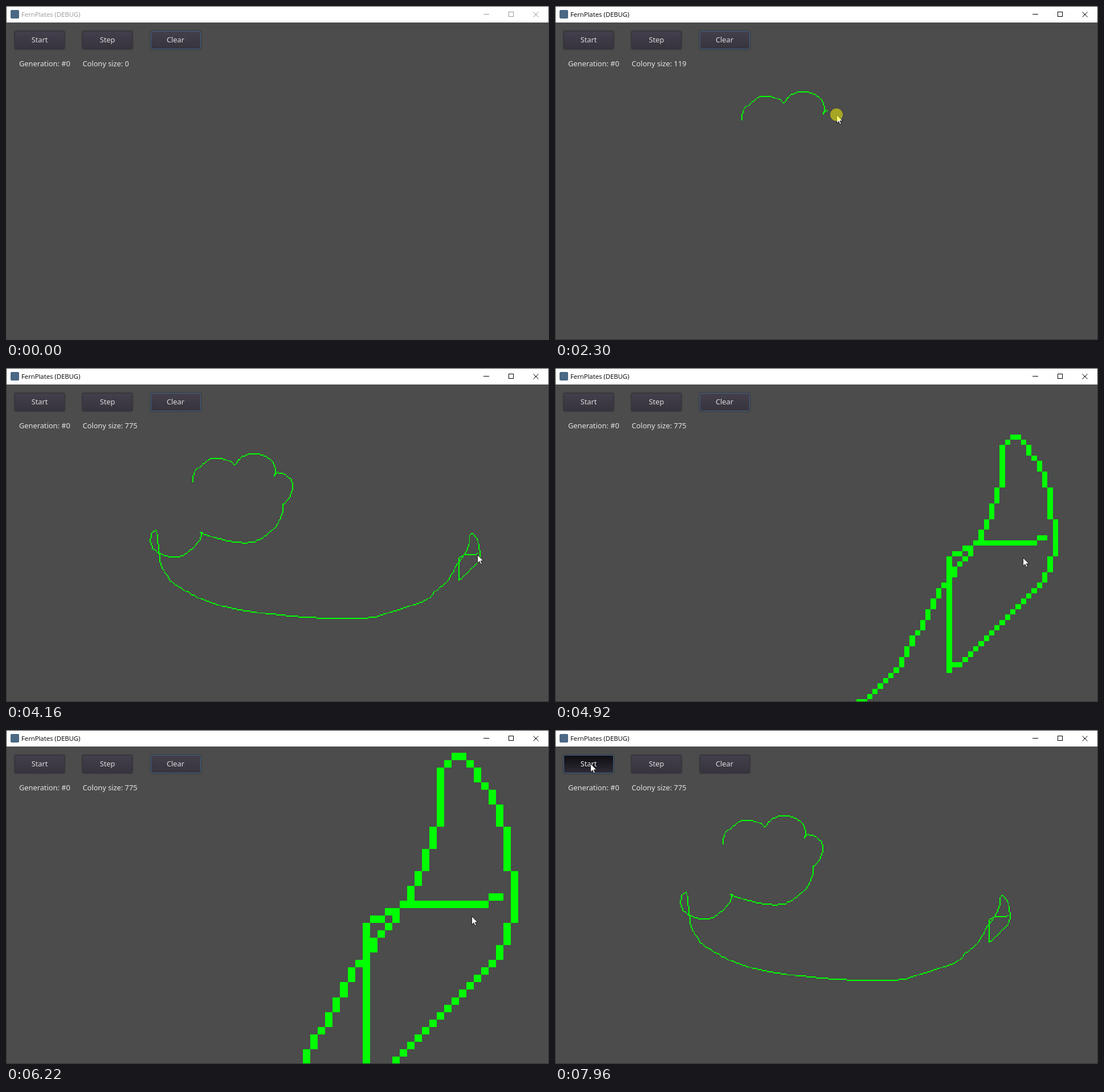
Write an HTML page with a canvas that moves like this. It is 953x587 px and loops after 8000 ms.

```html
<!DOCTYPE html>
<html lang="en">
<head>
<meta charset="utf-8">
<title>FernPlates</title>
<style>
  html, body { margin: 0; width: 100%; height: 100%; overflow: hidden; }
  #win { position: relative; width: 953px; height: 587px; overflow: hidden; background: #4b4c4b; }
  #win > * { position: absolute; }
  #field { left: 0; top: 0; }
  #bar { left: 0; top: 0; width: 953px; height: 29px; background: #fff; color: #999; }
  .active #bar { color: #000; }
  #bar * { position: absolute; }
  #icon { left: 8px; top: 7px; width: 15px; height: 15px; border-radius: 2px; background: #4b6884; }
  #name { left: 27px; top: 0; font: 11.3px/29px "Open Sans", sans-serif; white-space: pre; }
  #bar svg { left: 830px; top: 0; }
  .btn { top: 44px; width: 86px; height: 30px; border: 1px solid #34323a; border-radius: 3px;
    background: linear-gradient(#433f4b, #37343e); box-shadow: 0 0 0 1px #3d3c40, 0 0 2px 1px #3d3c42;
    color: #dcdcdc; text-align: center; }
  .btn, .label { font: 500 12.8px/29px "Noto Sans", sans-serif; white-space: pre; }
  .btn.hover { background: linear-gradient(#4a4653, #3d3a45); }
  .btn.focus { border-color: #416386; }
  .btn.down { background: linear-gradient(#0d0d11, #2d2b36); color: #f0f0f0; }
  .label { top: 87px; color: #e4e4e4; }
  #edge { inset: 0; border: 1px solid #484a4a; }
  .active #edge { border-color: #303232; }
  #mouse { left: 0; top: 0; overflow: visible; }
</style>
</head>
<body>
<div id="win">
  <canvas id="field" width="953" height="587"></canvas>
  <div id="bar">
    <div id="icon"></div>
    <div id="name">FernPlates (DEBUG)</div>
    <svg width="120" height="29" fill="none" stroke="currentColor">
      <path d="M8 14.5h10M52.5 10.5h8v8h-8z" shape-rendering="crispEdges"/>
      <path d="M95.5 10.5l9 9m0-9l-9 9"/>
    </svg>
  </div>
  <div class="btn" id="start" style="left:15px">Start</div>
  <div class="btn" style="left:134px">Step</div>
  <div class="btn" id="clear" style="left:253.5px">Clear</div>
  <div class="label" style="left:23px">Generation: #0</div>
  <div class="label" id="size" style="left:134.5px">Colony size: 0</div>
  <div id="edge"></div>
  <svg id="mouse" width="1" height="1">
    <path d="M.5 .5v14.5l3.4-3.2 2.3 5 2.3-1-2.3-4.9h4.7z" fill="#fff" stroke="#111" stroke-width=".9"/>
    <circle id="halo" r="11" fill="#fafa00" fill-opacity=".52"/>
  </svg>
</div>
<script>
const LOOP = 8000;
const CELL = 2 * 953 / 1024;
const ORIGIN = { x: 794, y: 290 };   // screen place of cell (0,0) at zoom 1
const PRESS = 1480, DRAW = 1620, RELEASE = 4100, START_DOWN = 7870;
const LAG = 53;                      // cells appear a moment after the mouse
const $ = id => document.getElementById(id);

// ---- The drawn stroke, as an ordered list of grid cells ----
const cells = [];

function lineTo(x, y) {
  const [px, py] = cells.length ? cells[cells.length - 1] : [x - 1, y];
  const n = Math.max(Math.abs(x - px), Math.abs(y - py));
  for (let i = 1; i <= n; i++)
    cells.push([Math.round(px + (x - px) * i / n), Math.round(py + (y - py) * i / n)]);
}

function trace(d) {
  const path = document.createElementNS("http://www.w3.org/2000/svg", "path");
  path.setAttribute("d", d);
  const len = path.getTotalLength();
  for (let s = 0; s < len + 3; s += 3) {
    const p = path.getPointAtLength(Math.min(s, len));
    lineTo(Math.round((p.x - ORIGIN.x) / CELL), Math.round((p.y - ORIGIN.y) / CELL));
  }
}

const lines = (...points) => points.forEach(p => lineTo(...p));

const pen = [[DRAW, 1, 1]];          // time, cells passed, colony size
const mark = (t, size) => pen.push([t, cells.length, size]);

// Three puffs and the back
trace("M327 198L328 184Q337 173 356 159Q378 152 402 169Q410 152 431 149.5Q456 150 467 164" +
  "Q476 181 469 190L474 183Q488 182 498 194Q508 208 493 232L484 238Q487 256 476 272Q461 295 433 305");
mark(2720, 191);
// Belly and the small loop
trace("M433 305Q395 310 339 288L343 287Q341 303 327 315Q313 329 299 331.5Q273 332 257 316" +
  "Q251 309 254 291Q257 283 264 286L268 325");
mark(3063, 328);
// Long sweep and the way up to the tip
trace("M268 325L271 347L287 372Q337 412 410 424Q520 442 630 438.5L651 436L737 407L762.4 383");
lines([-16, 50], [-10, 44], [-1, 28], [5, 20], [8, 14], [10, 8], [10, 2], [12, 0]);
mark(3540, 678);
// Down the far side and the closing bar
lines([13, 0], [15, 2], [15, 3], [18, 7], [20, 18], [20, 21], [18, 27], [3, 42], [0, 44],
  [0, 23], [5, 20], [15, 20], [18, 19]);
mark(4090, 775);

// ---- Motion ----
function at(keys, t) {
  const next = keys.findIndex(k => k[0] > t);
  if (next < 0) return keys[keys.length - 1].slice(1);
  const a = keys[Math.max(next - 1, 0)], b = keys[next];
  const f = next ? (t - a[0]) / (b[0] - a[0]) : 0;
  return a.slice(1).map((v, j) => v + (b[j + 1] - v) * f);
}

const moves = [];
const glide = (from, to, x, y) => {
  const last = moves[moves.length - 1];
  if (last) moves.push([from, ...last.slice(1)]);
  moves.push([to, x, y]);
};
glide(0, 310, 896, 583);
glide(310, 860, 273, 140);
glide(1140, 1400, 326, 197);
glide(RELEASE - 1, RELEASE, 827, 328);
glide(4160, 4370, 820.65, 333.3);
glide(4920, 5200, 836, 314);
glide(5750, 6080, 817, 327);
glide(6220, 6900, 777.4, 332.6);
glide(6900, 6980, 720, 332);
glide(6980, 7670, 62, 59);

const zooms = [];
function wheel(t, from, to, gap) {
  for (let z = from; z !== to; t += gap) {
    z += Math.sign(to - from);
    zooms.push([t, z]);
  }
}
wheel(4450, 1, 4, 70);
wheel(4850, 4, 5, 70);
wheel(5340, 5, 8, 140);
wheel(6150, 8, 1, 125);

// Every zoom step keeps the point under the mouse in place.
function view(t) {
  let zoom = 1, { x, y } = ORIGIN;
  for (const [when, next] of zooms) {
    if (when > t) break;
    const [mx, my] = at(moves, when);
    x = mx + (x - mx) * next / zoom;
    y = my + (y - my) * next / zoom;
    zoom = next;
  }
  return { x, y, size: CELL * zoom };
}

const ctx = $("field").getContext("2d");

function drawCells(n, { x, y, size }) {
  ctx.clearRect(0, 0, 953, 587);
  ctx.fillStyle = "#00ff00";
  for (const [cx, cy] of cells.slice(0, n)) {
    const l = Math.round(x + cx * size), r = Math.round(x + (cx + 1) * size);
    const top = Math.round(y + cy * size), bottom = Math.round(y + (cy + 1) * size);
    ctx.fillRect(l, top, r - l, bottom - top);
  }
}

function mouseAt(t) {
  if (t < DRAW || t > RELEASE) return at(moves, t);
  const [cx, cy] = cells[Math.round(at(pen, t)[0]) - 1];
  return [ORIGIN.x + cx * CELL, ORIGIN.y + cy * CELL];
}

function render(t) {
  const begun = t >= PRESS;
  drawCells(begun ? Math.round(at(pen, t - LAG)[0]) : 0, view(t));
  $("size").textContent = "Colony size: " + (begun ? Math.round(at(pen, t)[1]) : 0);

  const [mx, my] = mouseAt(t);
  $("mouse").style.transform = `translate(${Math.round(mx)}px, ${Math.round(my)}px)`;
  $("mouse").style.display = t < 310 ? "none" : "";
  $("halo").style.display = begun && t < RELEASE ? "" : "none";

  const down = t >= START_DOWN;
  const over = mx < 104 && my < 77;
  $("win").classList.toggle("active", begun);
  $("start").className = "btn" + (down ? " focus down" : over ? " hover" : "");
  $("clear").className = "btn" + (down ? "" : " focus");
}

function tick() {
  render(performance.now() % LOOP);
  requestAnimationFrame(tick);
}
tick();
</script>
</body>
</html>
```
